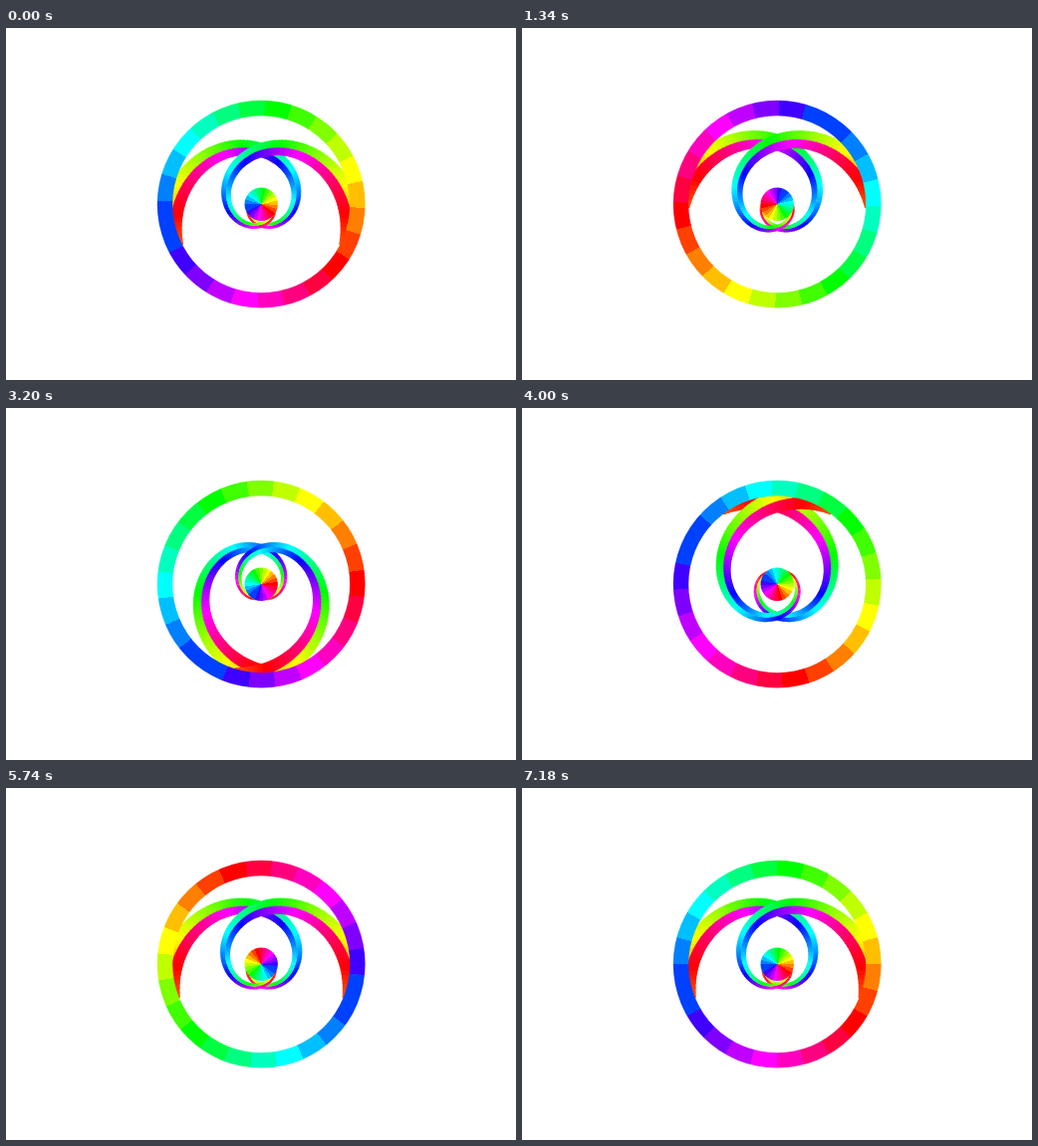
An HTML page with a canvas for the animation above (7.2 s loop, 512x354 px).

```html
<!DOCTYPE html>
<html lang="en">
<head>
<meta charset="utf-8">
<title>Counter-rotating colour spirals</title>
<style>
  html, body { margin: 0; width: 100%; height: 100%; overflow: hidden; background: #fff; }
  canvas { display: block; width: 512px; height: 354px; }
</style>
</head>
<body>
<canvas id="stage" width="512" height="354"></canvas>
<script>
const ctx = document.getElementById('stage').getContext('2d');
const STEP_MS = 20, STEPS = 360;
const SECTORS = 24;
const DISC = 16.7, RING_IN = 89, RING_OUT = 104.4;
const PHI = (1 + Math.sqrt(5)) / 2;
// Spiral edge radii at the outer end; each shrinks by PHI per quarter turn.
const EDGE_IN = 88, EDGE_MID = 102, EDGE_OUT = 116;
const SPIRAL_HUE = 20;
const rad = deg => deg * Math.PI / 180;
const hsl = hue => `hsl(${((hue % 360) + 360) % 360}, 100%, 50%)`;

// Pure blue repeats the lighter blue beside it.
const sectorHue = i => {
  const hue = (i * 360 / SECTORS + 45) % 360;
  return hue === 240 ? 225 : hue;
};

// Hard-edged colour wheel; an inner radius of 0 gives a disc.
function wheel(inner, outer, turn) {
  const colours = ctx.createConicGradient(rad(turn), 0, 0);
  for (let i = 0; i < SECTORS; i++) {
    colours.addColorStop(i / SECTORS, hsl(sectorHue(i)));
    colours.addColorStop((i + 1) / SECTORS, hsl(sectorHue(i)));
  }
  ctx.beginPath();
  ctx.arc(0, 0, outer, 0, 2 * Math.PI);
  ctx.arc(0, 0, inner, 2 * Math.PI, 0, true);
  ctx.fillStyle = colours;
  ctx.fill();
}

function band(inner, outer, turn, hueSign) {
  const step = 3;
  const point = (edge, a) => {
    // The outer end stays hidden beneath the ring.
    const r = Math.min(edge * PHI ** (-a / 90), 96);
    ctx.lineTo(r * Math.cos(rad(turn + a)), r * Math.sin(rad(turn + a)));
  };
  for (let a = 0; a < 360; a += step) {
    const end = a + step + 0.6;
    ctx.beginPath();
    point(inner, a);
    point(outer, a);
    point(outer, end);
    point(inner, end);
    ctx.fillStyle = hsl(SPIRAL_HUE + hueSign * (a + step / 2));
    ctx.fill();
  }
}

function spiral(turn, flip) {
  ctx.save();
  ctx.scale(flip, 1);
  band(EDGE_MID - 0.5, EDGE_OUT, turn, 1);
  band(EDGE_IN, EDGE_MID, turn, -1);
  ctx.restore();
}

function draw(step) {
  ctx.setTransform(1, 0, 0, 1, 0, 0);
  ctx.fillStyle = '#fff';
  ctx.fillRect(0, 0, 512, 354);
  ctx.setTransform(1, 0, 0, -1, 256.2, 177.2);

  const spiralTurn = -27.5 - 5 * step;
  spiral(spiralTurn, -1);
  spiral(spiralTurn, 1);

  const wheelTurn = -2 - 2 * step;
  wheel(RING_IN, RING_OUT, wheelTurn);
  wheel(0, DISC, wheelTurn);
}

const start = performance.now();
function tick() {
  const elapsed = performance.now() - start;
  draw(Math.floor(elapsed / STEP_MS) % STEPS);
  requestAnimationFrame(tick);
}
tick();
</script>
</body>
</html>
```
